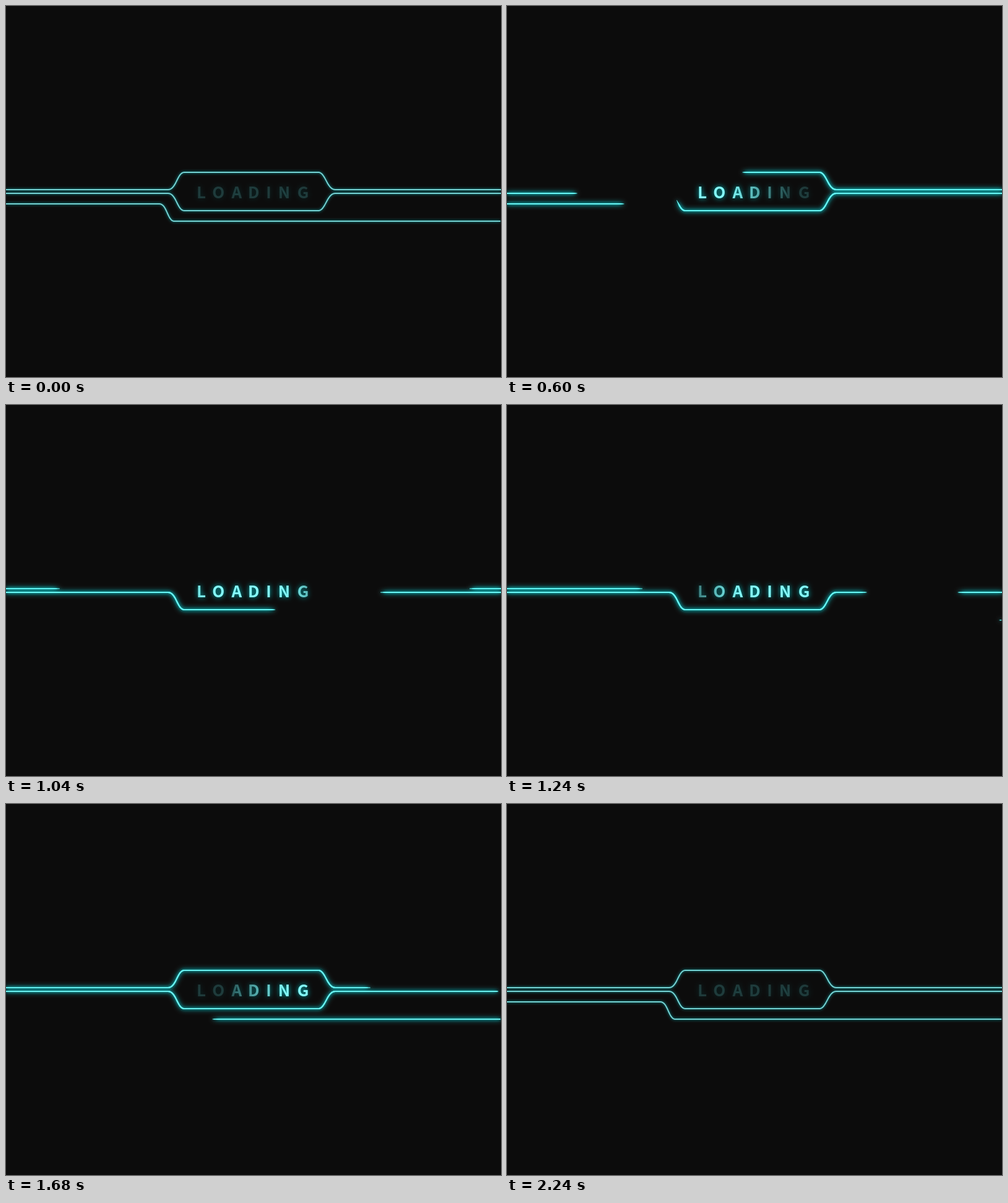
These frames come from a looping animation (800x600 px, 2.4 s). An HTML page with a canvas:

```html
<!DOCTYPE html>
<html lang="en">
<head>
<meta charset="utf-8">
<title>Loading</title>
<style>
  html, body { margin: 0; width: 100%; height: 100%; overflow: hidden; background: #0c0c0c; }
  canvas { display: block; }
</style>
</head>
<body>
<canvas id="stage" width="800" height="600"></canvas>
<script>
const ctx = document.getElementById('stage').getContext('2d');
const LOOP = 2400, STEP = 40, END = 2240;
const TAPER = 10;

const clamp = v => Math.max(0, Math.min(1, v));
const mix = (a, b, k) => a + (b - a) * k;

// Ease with flat ends; x1 and x2 are the horizontal handles.
function ease(u, x1 = 1 / 3, x2 = 2 / 3) {
  let lo = 0, hi = 1;
  for (let i = 0; i < 24; i++) {
    const s = (lo + hi) / 2, r = 1 - s;
    if (3 * x1 * r * r * s + 3 * x2 * r * s * s + s ** 3 < u) lo = s; else hi = s;
  }
  return lo * lo * (3 - 2 * lo);
}

// Piecewise linear value through [time, value] keys.
function keyed(t, keys) {
  for (let i = 1; i < keys.length; i++) {
    const [t0, v0] = keys[i - 1], [t1, v1] = keys[i];
    if (t <= t1) return mix(v0, v1, clamp((t - t0) / (t1 - t0)));
  }
  return keys[keys.length - 1][1];
}

// erase and draw: start, duration and optional ease handles
const lines = [
  { d: 'M0 297H262C275 297 277 269 288 269H505C516 269 519 297 532 297H800',
    erase: [18, 1205], draw: [735, 1270, 0.4, 0.8] },
  { d: 'M0 303H262C275 303 277 331 288 331H505C516 331 519 303 532 303H800',
    erase: [19, 1492], draw: [251, 1490] },
  { d: 'M799 348H272C261 348 260 320 248 320H0',
    erase: [5, 868], draw: [1200, 875] }
];

for (const line of lines) {
  const path = document.createElementNS('http://www.w3.org/2000/svg', 'path');
  path.setAttribute('d', line.d);
  line.length = path.getTotalLength();
  line.at = s => path.getPointAtLength(s);
  line.points = [];
  for (let s = 0; s < line.length; s += 2) line.points.push(sample(line, s));
}

// Point on the line with its unit normal.
function sample(line, s) {
  const p = line.at(s);
  const a = line.at(Math.max(0, s - 0.5)), b = line.at(Math.min(line.length, s + 0.5));
  const n = Math.hypot(b.x - a.x, b.y - a.y) || 1;
  return { s, x: p.x, y: p.y, nx: (a.y - b.y) / n, ny: (b.x - a.x) / n };
}

// Ribbon from a to b, thinning to a point at ends inside the line.
function ribbon(line, a, b) {
  const shape = new Path2D();
  const inner = line.points.filter(p => p.s > a && p.s < b);
  const pts = [sample(line, a), ...inner, sample(line, b)];
  const startTaper = Math.min(TAPER, a), endTaper = Math.min(TAPER, line.length - b);
  const half = s => Math.min(1,
    startTaper > 0.01 ? (s - a) / startTaper : 1,
    endTaper > 0.01 ? (b - s) / endTaper : 1);
  for (const p of pts) shape.lineTo(p.x + p.nx * half(p.s), p.y + p.ny * half(p.s));
  for (const p of pts.reverse()) shape.lineTo(p.x - p.nx * half(p.s), p.y - p.ny * half(p.s));
  shape.closePath();
  return shape;
}

function fillGlow(shape, blur, alpha) {
  ctx.shadowBlur = blur;
  ctx.shadowColor = `rgba(10, 215, 220, ${alpha})`;
  ctx.fill(shape);
}

function progress(t, [start, span, x1, x2]) {
  const u = (t - start) / span;
  return u <= 0 ? 0 : u >= 1 ? 1 : ease(u, x1, x2);
}

function drawLines(t) {
  const glow = keyed(t, [[0, 0], [480, 1], [1560, 1], [1840, 0.6], [2240, 0]]);
  ctx.fillStyle = `rgb(${mix(116, 104, glow)}, ${mix(210, 248, glow)}, ${mix(211, 246, glow)})`;
  for (const line of lines) {
    const tail = progress(t, line.erase) * line.length;
    const head = progress(t, line.draw) * line.length;
    const shapes = [];
    if (tail < line.length) shapes.push(ribbon(line, tail, line.length));
    if (head > 0) shapes.push(ribbon(line, 0, head));
    for (const shape of shapes) {
      if (glow > 0) {
        fillGlow(shape, 8, 0.9 * glow);
        fillGlow(shape, 7, 0.8 * glow);
      }
      fillGlow(shape, 4, 0.7);
    }
  }
}

// Ink centres of the letters
const letters = { L: 316.4, O: 343.3, A: 372.4, D: 401, I: 424.7, N: 449.8, G: 479.8 };
const PITCH = 27.3;

function drawText(t) {
  const lit = keyed(t, [[0, -2.5], [600, 3.3], [840, 4.9], [1240, 8.5]]);
  const dark = keyed(t, [[960, -2.2], [1240, 0.4], [1520, 2.2], [1840, 4.2], [2240, 8.4]]);
  const front = (edge, i) => clamp(0.5 + (edge - i) / 3.8);

  const left = 303, right = 497, stops = 24;
  const fill = ctx.createLinearGradient(left, 0, right, 0);
  for (let k = 0; k <= stops; k++) {
    const i = (mix(left, right, k / stops) - letters.L) / PITCH;
    const level = front(lit, i) * (1 - front(dark, i));
    fill.addColorStop(k / stops, `rgba(132, 252, 252, ${0.16 + 0.84 * level})`);
  }
  ctx.fillStyle = fill;
  ctx.shadowBlur = 8;
  ctx.shadowColor = 'rgba(0, 220, 225, 0.9)';
  ctx.font = '700 26px "Noto Sans CJK JP", "Noto Sans CJK SC", "Open Sans", sans-serif';
  for (const [char, x] of Object.entries(letters)) {
    const m = ctx.measureText(char);
    ctx.fillText(char, x - (m.actualBoundingBoxRight - m.actualBoundingBoxLeft) / 2, 311);
  }
}

function render(t) {
  ctx.shadowBlur = 0;
  ctx.shadowColor = 'transparent';
  ctx.fillStyle = '#0c0c0c';
  ctx.fillRect(0, 0, 800, 600);
  drawLines(t);
  drawText(t);
}

const begin = performance.now();
function tick() {
  const t = (performance.now() - begin) % LOOP;
  render(Math.min(END, Math.floor(t / STEP) * STEP));
  requestAnimationFrame(tick);
}
tick();
</script>
</body>
</html>
```
